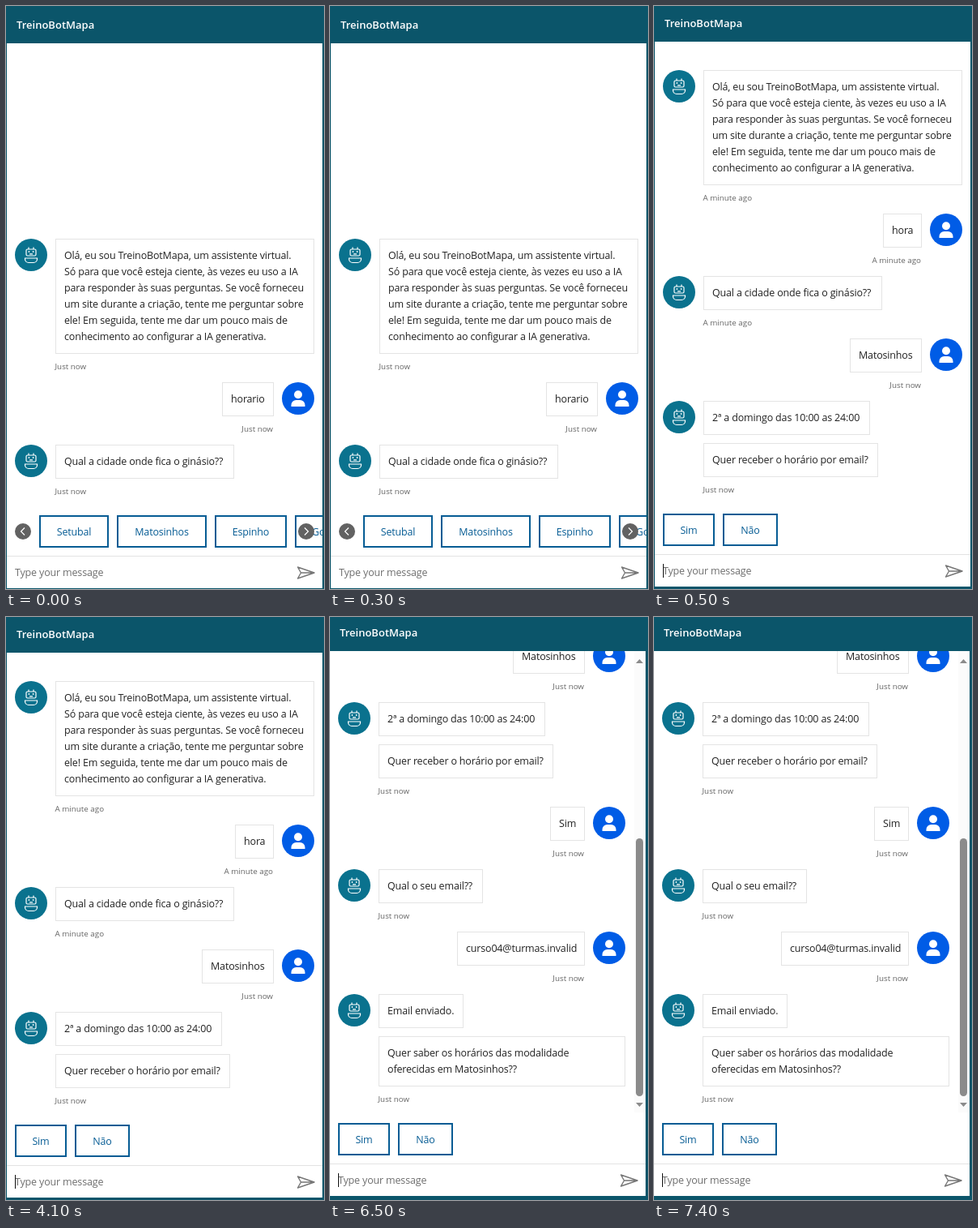
Animation, 393 px wide and 719 px high, one loop 8 s. Source, as an HTML page:

```html
<!DOCTYPE html>
<html lang="pt">
<head>
<meta charset="utf-8">
<title>Chat</title>
<style>
  html, body { margin: 0; width: 100%; height: 100%; overflow: hidden; background: #fff; }
  svg { position: absolute; left: 0; top: 0; display: block; }
  text { font: 12.5px "Open Sans", "Noto Sans", sans-serif; letter-spacing: -.17px; fill: #222; white-space: pre; }
  .title { font-size: 13px; font-weight: 600; letter-spacing: 0; fill: #fff; }
  .time { font-size: 9.8px; letter-spacing: 0; fill: #666; }
  .hint { fill: #6e6e6e; }
  .choice { fill: #065c94; text-anchor: middle; }
  .end { text-anchor: end; }
  .bubble { fill: #fff; stroke: #e4e4e4; }
  .button { fill: #fff; stroke: #065c94; stroke-width: 2; }
  .line { fill: none; stroke: #fff; stroke-width: 1.2; }
  .send { fill: none; stroke: #767676; stroke-width: 1.4; stroke-linejoin: round; }
</style>
</head>
<body>
<script>
const W = 393, H = 719, LOOP = 8000;
const TEAL = '#0b556a', BOT = '#0a728e', USER = '#005ce6';
const NAME = 'TreinoBotMapa';

const rect = (x, y, w, h, attrs) => `<rect x="${x}" y="${y}" width="${w}" height="${h}" ${attrs}/>`;
const label = (x, y, s, cls = '') => `<text x="${x}" y="${y}" class="${cls}">${s}</text>`;
const shift = (x, y, body) => `<g transform="translate(${x} ${y})">${body}</g>`;

const botIcon = y => shift(31, y + 20, `<circle r="20" fill="${BOT}"/>
  <g class="line"><rect x="-6" y="-7" width="12" height="8" rx="1.5"/>
  <path d="M-3 -7V-9.5M3 -7V-9.5M-2 -1.2H2M-7.5 4H7.5V5A4.5 4.5 0 0 1 3 9.5H-3A4.5 4.5 0 0 1 -7.5 5Z"/></g>
  <g fill="#fff"><circle cx="-2.6" cy="-4" r=".9"/><circle cx="2.6" cy="-4" r=".9"/></g>`);

const userIcon = (x, y) => shift(x, y + 20, `<circle r="20" fill="${USER}"/>
  <g fill="#fff"><circle cy="-4.8" r="5"/><path d="M-8.5 10V8A6 6 0 0 1 -2.5 2H2.5A6 6 0 0 1 8.5 8V10Z"/></g>`);

const bubble = (x, y, w, lines) =>
  rect(x + .5, y + .5, w - 1, 21 + 20 * lines.length, 'class="bubble"') +
  lines.map((s, i) => label(x + 11, y + 25 + 20 * i, s)).join('');

// Each message: [speaker, bubble width, text lines, time]; without a time the next bubble joins the group.
function messages(list, y, right) {
  let joined = false;
  return list.map(([who, width, lines, time]) => {
    const mine = who === 'user', bottom = y + 22 + 20 * lines.length;
    let out = bubble(mine ? right - width : 61, y, width, lines);
    if (mine) out += userIcon(right + 30, y);
    else if (!joined) out += botIcon(y);
    if (time) out += label(mine ? right - 1 : 60.5, bottom + 19, time, mine ? 'time end' : 'time');
    joined = !time;
    y = bottom + (time ? 35 : 10);
    return out;
  }).join('');
}

const buttons = list => list.map(([x, w, s]) =>
  rect(x + 1, 629, w - 2, 38, 'class="button"') + label(x + w / 2, 653, s, 'choice')).join('');

const arrow = (x, dir) => shift(x, 648,
  `<circle r="10" fill="#626262"/><path class="line" d="M${-2 * dir} -4.5L${2.5 * dir} 0L${-2 * dir} 4.5"/>`);

const caret = rect(11, 690, 1, 17, 'fill="#111"');

const scrollbar = rect(377, 42, 14, 569, 'fill="#fbfbfb"') +
  rect(379, 273, 9, 318, 'rx="4.5" fill="#8b8b8b"') +
  '<path fill="#8b8b8b" d="M379 57L383.5 52L388 57ZM379 599L383.5 604L388 599Z"/>';

// Header, input row and bottom edge move together between scenes.
const chrome = rect(-2, -10, W + 8, 56, `fill="${TEAL}"`) + label(13, 28, NAME, 'title') +
  rect(0, 678, W, 1, 'fill="#e3e3e3"') + label(11, 703, 'Type your message', 'hint') +
  shift(360.5, 692, '<path class="send" d="M0 0L20.5 7L0 14L4 7ZM4 7H20"/>') +
  rect(0, 718, W + 8, 10, `fill="${TEAL}"`);

const intro = [`Olá, eu sou ${NAME}, um assistente virtual.`,
  'Só para que você esteja ciente, às vezes eu uso a IA',
  'para responder às suas perguntas. Se você forneceu',
  'um site durante a criação, tente me perguntar sobre',
  'ele! Em seguida, tente me dar um pouco mais de',
  'conhecimento ao configurar a IA generativa.'];
const city = 'Qual a cidade onde fica o ginásio??';
const now = 'Just now', minute = 'A minute ago';
const hours = [
  ['bot', 206, ['2ª a domingo das 10:00 as 24:00']],
  ['bot', 216, ['Quer receber o horário por email?'], now]];
const yesNo = buttons([[11, 64, 'Sim'], [85, 68, 'Não']]);

const scenes = [
  { from: 0, dx: 0, dy: 0, edge: 2, top: 287, right: 331,
    chat: [['bot', 320, intro, now], ['user', 64, ['horario'], now], ['bot', 221, [city], now]],
    extra: buttons([[41, 86, 'Setubal'], [137, 111, 'Matosinhos'], [258, 89, 'Espinho'], [357, 104, 'Gondomar']]) +
      arrow(21, -1) + arrow(371, 1) },
  { from: 500, dx: 0, dy: -2, edge: 2, top: 79, right: 331,
    chat: [['bot', 320, intro, minute], ['user', 48, ['hora'], minute], ['bot', 221, [city], minute],
      ['user', 89, ['Matosinhos'], now], ...hours],
    extra: yesNo + caret },
  { from: 6500, dx: -1, dy: -4, edge: 3, top: 28, right: 316, bar: scrollbar,
    chat: [['user', 89, ['Matosinhos'], now], ...hours, ['user', 43, ['Sim'], now],
      ['bot', 129, ['Qual o seu email??'], now], ['user', 158, ['curso04@turmas.invalid'], now],
      ['bot', 105, ['Email enviado.']],
      ['bot', 305, ['Quer saber os horários das modalidade', 'oferecidas em Matosinhos??'], now]],
    extra: yesNo + caret }
];

const sides = ({ dx, edge }) =>
  rect(dx, 0, 1, H, `fill="${TEAL}"`) + rect(W - edge, 0, edge, H, `fill="${TEAL}"`);

const svg = document.createElementNS('http://www.w3.org/2000/svg', 'svg');
svg.setAttribute('width', W);
svg.setAttribute('height', H);
svg.innerHTML = scenes.map(s => '<g>' + rect(0, 0, W, H, 'fill="#fff"') +
  shift(s.dx, 0, messages(s.chat, s.top, s.right) + (s.bar || '') + shift(0, s.dy, chrome + s.extra)) +
  sides(s) + '</g>').join('');
document.body.append(svg);

// Scenes are stacked: each later one covers the previous until the loop restarts.
scenes.slice(1).forEach(({ from }, i) => {
  const start = from / LOOP;
  svg.children[i + 1].animate(
    [[0, 0], [0, start], [1, start], [1, 1]].map(([opacity, offset]) => ({ opacity, offset })),
    { duration: LOOP, iterations: Infinity });
});
</script>
</body>
</html>
```
